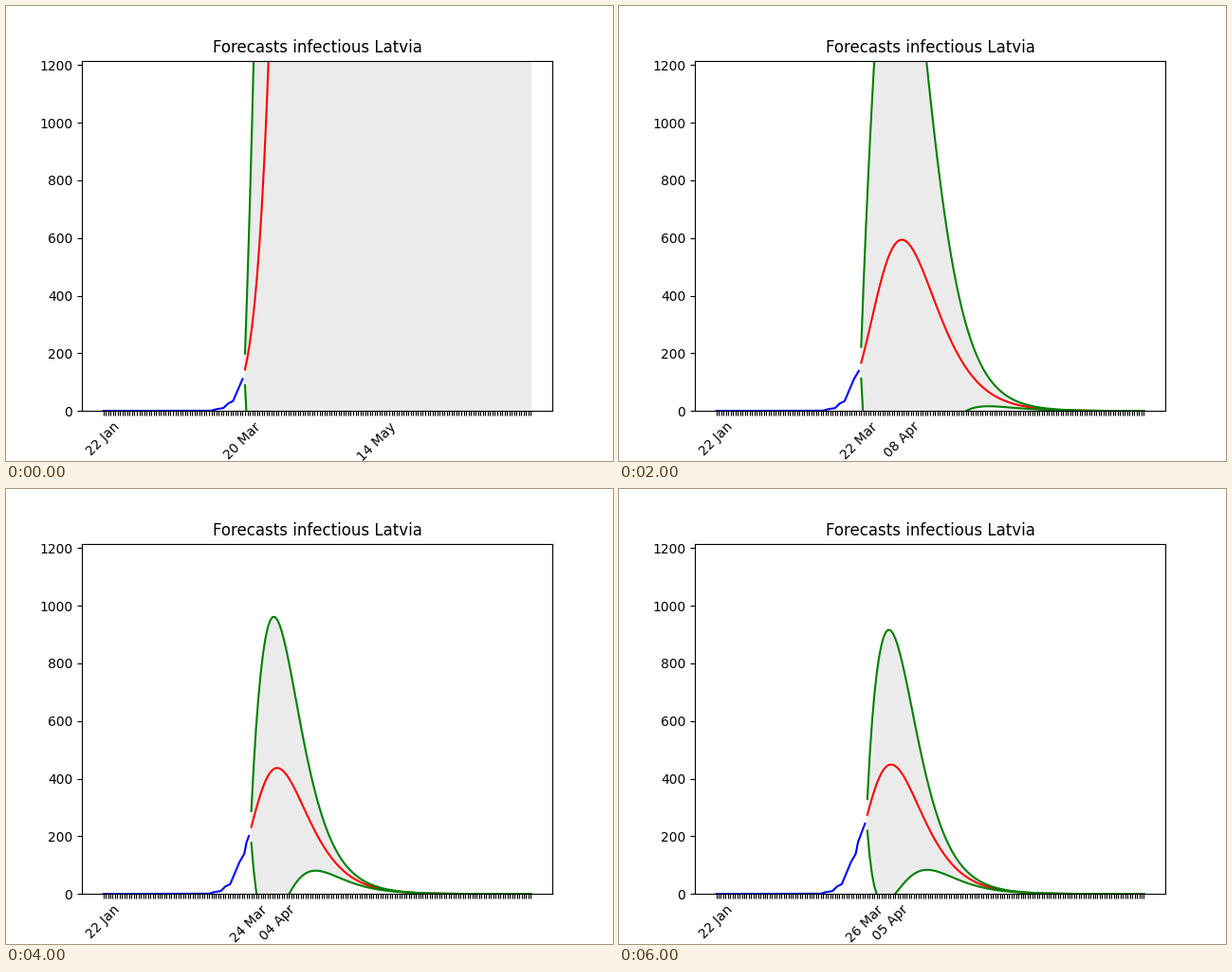
A matplotlib script for the animation above (7000 ms loop, 640x480 px).

```python
import numpy as np
import matplotlib.pyplot as plt
from matplotlib.animation import FuncAnimation

HORIZON = 120
FIRST_DAY = np.datetime64("2020-01-22")
FIRST_FIT = 58     # index of the last observed day in the first forecast
RECOVERY = 0.102   # daily recovery rate
SPREAD = 55        # half-width of the band on its first day

# key points (day, cases) of the observed curve
OBSERVED = [(0, 0), (45, 1), (47, 6), (50, 10), (52, 26), (54, 34),
            (58, 111), (60, 139), (61, 180), (64, 244)]

# peak day after the last observation, peak height, band level, band half-life
FORECASTS = [
    (56, 38250, 3, 300),
    (35.05, 3340, 2.9, 72),
    (18.1, 594, 2.6, 35.7),
    (15.2, 576, 1.8, 29.5),
    (12, 437, 1.375, 25.1),
    (12.1, 460, 1.255, 27.7),
    (11.2, 449, 1.14, 29.3),
]


def cases(day):
    return np.interp(day, *zip(*OBSERVED))


def epidemic(t, start, peak_day, peak):
    """Infection rate decays exponentially and equals recovery at the peak."""
    u = np.linspace(0.01, 3, 3000)
    target = 1 + np.log(peak / start) / (RECOVERY * peak_day)
    log_ratio = np.interp(target, np.expm1(u) / u, u)
    decay = log_ratio / peak_day
    infection = RECOVERY * np.exp(log_ratio)
    return start * np.exp(infection / decay * (1 - np.exp(-decay * t)) - RECOVERY * t)


def band_ratio(t, first, level, half_life):
    """Half-width of the band relative to the mean: quick rise, slow fall."""
    rise = level - (level - first) * np.exp(-t / 2)
    return rise / (1 + (t / half_life) ** 2.2)


def day_label(index):
    return (FIRST_DAY + int(index)).item().strftime("%d %b")


fig, ax = plt.subplots(figsize=(6.4, 4.8), dpi=100)


def draw(i):
    ax.clear()
    last = FIRST_FIT + i
    total = last + 1 + HORIZON
    peak_day, peak, level, half_life = FORECASTS[i]

    t = np.arange(1, HORIZON + 1)
    mean = epidemic(t, cases(last), peak_day, peak)
    width = mean * band_ratio(t - 1, SPREAD / mean[0], level, half_life)
    past, future = np.arange(last + 1), last + t

    ax.fill_between(future, mean - width, mean + width, color="#ebebeb")
    ax.plot(past, cases(past), color="blue")
    ax.plot(future, mean, color="red")
    for bound in (mean - width, mean + width):
        ax.plot(future, bound, color="green")

    top = last + round(peak_day)
    labels = [""] * total
    labels[0] = day_label(0)
    labels[last] = day_label(last)
    labels[top] = day_label(top - 1)
    ax.set_xticks(range(total), labels, rotation=45)

    margin = 0.05 * (total - 1)
    ax.set_xlim(-margin, total - 1 + margin)
    ax.set_ylim(0, 1215)
    ax.set_title("Forecasts infectious Latvia")
    return []


anim = FuncAnimation(fig, draw, frames=len(FORECASTS), init_func=lambda: draw(0),
                     interval=1000, repeat=True, repeat_delay=0)
plt.show()
```
